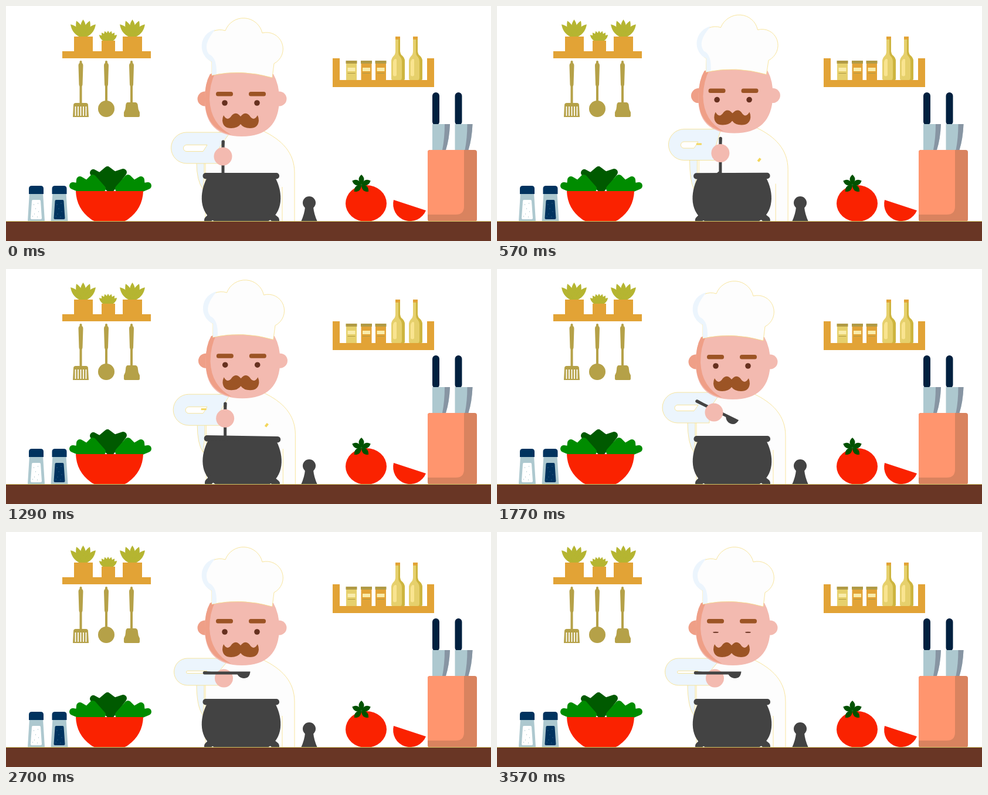
Write an HTML page that moves like this. It is 827x400 px and loops after 3.6 s.

```html
<!DOCTYPE html>
<html lang="en">
<head>
<meta charset="utf-8">
<title>Cook at the stove</title>
<style>
html, body { margin: 0; width: 100%; height: 100%; overflow: hidden; background: #fff }
svg { display: block; width: 827px; height: 400px }
.line { stroke: #f7df86; stroke-width: .8 }
.white { fill: #fdfdfd }
.blue { fill: #ecf5fd }
.orange { fill: #e2a336 }
.olive { fill: #b5a148 }
.navy { fill: #00335f }
.steel { fill: #adc8cf }
.red { fill: #fa2200 }
.dark { fill: #434343 }
.brown { fill: #9c5425 }
.skin { fill: #f3bab0 }
.shade { fill: #ef9f87 }
.lobes { stroke-width: 12; stroke-linejoin: round }
</style>
</head>
<body>
<svg viewBox="0 0 827 400">
  <!-- plant shelf -->
  <g id="plants" fill="#b5b531"></g>
  <path class="orange" d="M96 77h20V52h32v25h15V59h23v18h13V52h33v25h15v12H96z"/>

  <!-- hanging tools -->
  <defs>
    <path id="grip" d="M-2 100V95a2 2 0 0 1 4 0v2q2 1 2 4l-1 33-1 3v28h-4v-28l-1-3-1-33q0-3 2-4z"/>
  </defs>
  <g class="olive">
    <use href="#grip" x="127.5"/>
    <path d="M119 165h17q4 0 4 4l1 20h-27l1-20q0-4 4-4z"/>
    <path d="M118.500 171v16m4.500-16v16m4.500-16v16m4.500-16v16m4.500-16v16" stroke="#fff" stroke-width="1.800"/>
    <use href="#grip" x="171"/>
    <circle cx="171" cy="175" r="14"/>
    <use href="#grip" x="214"/>
    <path d="M207 164h14q4 1 4 7 0 5 3 10v6q0 2-2 2h-23q-2 0-2-2v-6q3-5 3-10 0-6 3-7z"/>
  </g>

  <!-- spice shelf -->
  <path class="orange" d="M557 89h12v37h149V89h12v49H557z"/>
  <defs>
    <g id="jar">
      <path d="M0 98h18v28H0z"/>
      <path d="M-.5 93h19v5h-19z" fill="#b09a45"/>
      <path d="M2.500 105h13v6h-13z" fill="#f9ecab"/>
      <path d="M2.500 114.500h13" stroke="#b09a45"/>
    </g>
    <g id="bottle">
      <path d="M7 56h8v21q0 5 4 8 4 4 4 9v30q0 2-2 2H2q-2 0-2-2V94q0-5 4-9 3-3 3-8z" fill="#e6d06c"/>
      <path d="M12 56h3v21q0 5 4 8 4 4 4 9v30q0 2-2 2h-5q2-1 2-4V95q0-6-4-10-2-2-2-7z" fill="#cdb53f"/>
      <path d="M3 96q0-3 2-5t4 0v27q-3 3-6 0z" fill="#f9e490"/>
      <path class="orange" d="M7 52h8v5H7z"/>
    </g>
  </defs>
  <use href="#jar" x="580" fill="#e6d06c"/>
  <use href="#jar" x="605.5" fill="#e2a336"/>
  <use href="#jar" x="630" fill="#e2a336"/>
  <use href="#bottle" x="657"/>
  <use href="#bottle" x="687"/>

  <!-- knives -->
  <defs>
    <g id="knife">
      <rect y="147" width="12" height="56" rx="6" fill="#00203f"/>
      <path class="steel" d="M0 201h30q-1 25-7 44H0z"/>
      <path d="M21 201h9q-1 25-7 44h-6q4-20 4-44z" fill="#8795a3"/>
    </g>
  </defs>
  <use href="#knife" x="727"/>
  <use href="#knife" x="765.5"/>
  <rect x="719" y="245" width="84" height="122" rx="4" fill="#d9835f"/>
  <path d="M723 245h58v96q0 14-14 14h-48V249q0-4 4-4z" fill="#ff956e"/>

  <!-- salt and pepper -->
  <defs>
    <g id="shaker">
      <path class="steel" d="M3 318h23l3 48H0z"/>
      <path class="navy" d="M2 320v-9q0-5 5-5h15q5 0 5 5v9z"/>
    </g>
    <path id="pane" d="M9 330h11q2 0 2 2l2 29q0 2-2 2H7q-2 0-2-2l2-29q0-2 2-2z"/>
    <path id="grains" d="M10 338h1m6-2h1m-5 9h1m4 5h1m-8 4h1m4 5h1m-9-1h1" stroke-width="1.3"/>
  </defs>
  <use href="#shaker" x="37"/>
  <use href="#pane" x="37" fill="#fff"/>
  <use href="#grains" x="37" stroke="#adc8cf"/>
  <use href="#shaker" x="76.5"/>
  <use href="#pane" x="76.5" class="navy"/>
  <use href="#grains" x="76.5" stroke="#335f85"/>

  <!-- salad -->
  <path class="lobes" fill="#005a00" stroke="#005a00" d="M178 312L149 284 160 290 173 279 185 288 200 283z"/>
  <defs>
    <path id="lettuce" class="lobes" d="M114 306L125 308 126 296 138 303 148 293 164 311H126z"/>
  </defs>
  <g fill="#008c00" stroke="#008c00">
    <use href="#lettuce"/>
    <use href="#lettuce" transform="matrix(-1 0 0 1 356 0)"/>
  </g>
  <path class="red" d="M119 315h115q-1 30-26 48-5 4-12 4h-39q-7 0-12-4-25-18-26-48z"/>

  <!-- tomato and pepper mill -->
  <ellipse class="red" cx="614" cy="336" rx="35" ry="31"/>
  <g id="stalk" fill="#005200"></g>
  <path class="red" d="M661 330l55 18A29 29 0 0 1 661 330z"/>
  <circle class="dark" cx="517" cy="335" r="11"/>
  <path class="dark" d="M510 342h14q1 12 7 25h-28q6-13 7-25z"/>

  <!-- cook -->
  <g id="body">
    <path class="white line" d="M340 400V225q20-12 42-13h55c34 16 55 38 55 72v116z"/>
    <path class="line" d="M471 308v92" fill="none"/>
    <path class="speck" d="M441 270l4-5" stroke="#f3d65c" stroke-width="4"/>
  </g>
  <path id="flank" class="blue line"/>
  <path id="sleeve" class="blue line"/>
  <path id="gap" fill="#fff" class="line"/>
  <path id="fold" class="speck" stroke="#f3d65c" stroke-width="3"/>
  <g id="head">
    <circle class="shade" cx="339" cy="158" r="12.5"/>
    <circle class="skin" cx="466" cy="158" r="12.5"/>
    <path class="skin" d="M348 116q54-10 108 0 10 18 10 42 0 64-64 64t-63-64q0-26 9-42z"/>
    <path class="shade" d="M348 116l9-3q-10 20-10 46 2 42 37 60-45-10-45-61 0-26 9-42z"/>
    <path class="white line" d="M351 118V95A29 29 0 0 1 374 42 33 33 0 0 1 437 46 28 28 0 0 1 457 98L454 122Q402 107 351 118z"/>
    <path class="blue" d="M351 118V95A29 29 0 0 1 357 40Q334 66 346 82 360 88 359 116z"/>
    <g id="features">
      <g id="brows" class="brown">
        <rect x="358" y="146" width="29" height="7.5" rx="3.5"/>
        <rect x="414" y="146" width="29" height="7.5" rx="3.5"/>
      </g>
      <g fill="#66301f">
        <ellipse class="eye" cx="373" cy="165" rx="4.8"/>
        <ellipse class="eye" cx="428" cy="165" rx="4.8"/>
      </g>
      <path class="brown" d="M400 188q-5-6-10-5-4 1-7 6-6 7-12-3-2 4-2 9 1 13 15 13 11 0 16-7 5 7 16 7 14 0 15-13 0-5-2-9-6 10-12 3-3-5-7-6-5-1-10 5z"/>
    </g>
  </g>
  <g id="grasp">
    <path id="spoon" class="dark" d="M-33-3l12 .5H45Q44 9 34 9 27 9 23 2.500H-33a2.700 2.700 0 0 1 0-5.500z"/>
    <circle id="hand" class="skin" r="15.5"/>
  </g>

  <g id="pot" class="dark">
    <rect x="335.5" y="284" width="130.5" height="10.5" rx="5"/>
    <path d="M343 292H459C473 318 473 352 446 367H356C329 352 329 318 343 292z"/>
    <path d="M353 355l-9 9v6m105-15l11 9v6" fill="none" stroke="#434343" stroke-width="12" stroke-linejoin="round"/>
  </g>

  <path d="M0 366.500h827" stroke="#d3c565"/>
  <path d="M0 367h827v33H0z" fill="#693625"/>
</svg>
<script>
const LOOP = 3600, STIR = 1080;
const $ = id => document.getElementById(id);
const set = (id, name, value) => $(id).setAttribute(name, value);
const shift = (id, x, y) => set(id, 'transform', `translate(${x} ${y})`);

// A fan of pointed leaves around one root
function fan(id, x, y, length, width, count, spread) {
  for (let i = 0; i < count; i++) {
    const angle = spread * (i / (count - 1) - .5);
    $(id).innerHTML += `<path transform="translate(${x} ${y}) rotate(${angle})"
      d="M0 0Q${-width} ${-length * .55} 0 ${-length}Q${width} ${-length * .55} 0 0"/>`;
  }
}
fan('plants', 131.5, 55, 32, 10, 5, 84);
fan('plants', 174, 62, 20, 7, 7, 100);
fan('plants', 215.5, 55, 32, 10, 5, 84);
fan('stalk', 606, 304, 17, 9, 5, 270);

// Smooth step from 0 to 1 between two times
function ramp(t, from, to) {
  const u = Math.min(1, Math.max(0, (t - from) / (to - from)));
  return u * u * (3 - 2 * u);
}

function draw(t) {
  const lift = ramp(t, 1380, 1740);   // spoon leaves the pot
  const turn = ramp(t, 1500, 1920);   // spoon goes level
  const sink = ramp(t, 1800, 2200);   // cook settles to taste
  const nod = ramp(t, 2350, 2520) - ramp(t, 2520, 2690);
  const hop = ramp(t, 2700, 3150) - ramp(t, 3210, 3360);
  const raise = ramp(t, 2100, 2300) - ramp(t, 2400, 2600);

  const phase = 2 * Math.PI * t / STIR;
  const swing = (1 - Math.cos(phase)) / 2 * (1 - lift);
  const tilt = Math.sin(phase) * (1 - lift);

  const lean = 7 * swing;
  const drop = 5 * sink - 5.5 * swing - 10 * nod - 21 * hop;
  const hx = 370 + 11 * swing + 1.5 * sink;
  const hy = 256 + drop - 12 * lift;
  const top = 215 + drop - 5 * lift;
  const bottom = 268 + drop - 6 * lift - 6 * sink;

  shift('body', lean * .6, drop);
  set('head', 'transform', `matrix(1 0 ${-lean / 255} 1 ${lean * 320 / 255} ${drop})`);
  shift('features', -lean * .3, 0);
  shift('brows', 0, -3 * sink - 6 * raise);
  set('pot', 'transform', `rotate(${tilt} 400 367) translate(${tilt} 0)`);

  const bend = hx - 62, r = (bottom - top) / 2;
  set('sleeve', 'd', `M382 ${top}H${bend}A${r} ${r} 0 0 0 ${bend} ${bottom}H${hx - 8}V${bottom - 24}Z`);
  const y1 = top + 21.5, y2 = bottom - 20.5, h = (y2 - y1) / 2;
  set('gap', 'd', `M${bend} ${y1}H343L336 ${y2}H${bend}A${h} ${h} 0 0 1 ${bend} ${y1}Z`);
  const x = 325 + lean * .5;
  set('flank', 'd', `M${x} ${bottom - 2}Q${x} 298 336 312L${x + 13} 285V${bottom - 2}Z`);
  set('fold', 'd', `M${bend + 21} ${y1 + 4}h9`);

  shift('grasp', hx, hy);
  set('spoon', 'transform',
    `translate(0 ${-9 * turn ** 2}) rotate(${90 * (1 - turn)}) translate(${8 * (1 - turn) ** 2} 0)`);
  // The level spoon lies on top of the fingers
  const front = turn > .9 ? 'spoon' : 'hand';
  if ($('grasp').lastElementChild.id !== front) $('grasp').append($(front));

  const shut = Math.min(1, Math.max(0, (t - 3510) / 60));
  for (const eye of document.querySelectorAll('.eye')) {
    eye.setAttribute('ry', 4.8 - 3.8 * shut);
    eye.setAttribute('cy', 165 + .7 * shut);
  }
  for (const speck of document.querySelectorAll('.speck'))
    speck.style.display = t > 150 && t < 1500 ? '' : 'none';
}

function tick() {
  draw(performance.now() % LOOP);
  requestAnimationFrame(tick);
}
tick();
</script>
</body>
</html>
```
